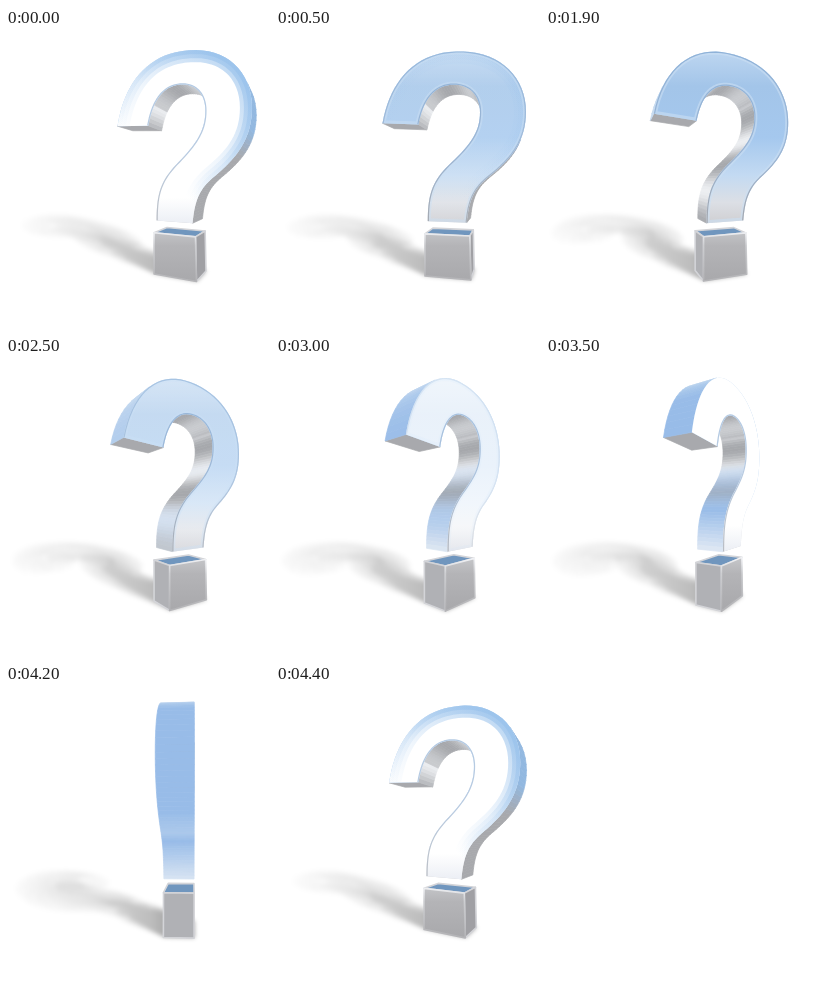
Recreate the animation shown at these times as an HTML page with a canvas. Size 264 by 300 pixels, loop 4500 ms.

```html
<!DOCTYPE html>
<html lang="en">
<head>
<meta charset="utf-8">
<title>Turning question mark</title>
<style>
  html, body { margin: 0; width: 100%; height: 100%; overflow: hidden; background: #fff; }
  canvas { position: absolute; left: 0; top: 0; }
  #shade { filter: blur(2px); }
</style>
</head>
<body>
<canvas id="shade" width="264" height="300"></canvas>
<canvas id="mark" width="264" height="300"></canvas>
<script>
const shade = document.getElementById('shade').getContext('2d');
const ctx = document.getElementById('mark').getContext('2d');
const AXIS = 174, HORIZON = 150, CAMERA = 250, HALF = 14, GROUND = 94;
const FRONT = CAMERA / (CAMERA - HALF);
const LIGHTS = 12;
const clamp = v => Math.max(0, Math.min(1, v));
const mix = (a, b, k) => a.map((v, i) => v + (b[i] - v) * k);
const rgb = c => `rgb(${c.map(Math.round)})`;

// Outlines run clockwise, in screen pixels of the front face seen head-on.
const toLocal = ([x, y]) => [(x - AXIS) / FRONT, (y - HORIZON) / FRONT];

function curve(start, list, steps = 18) {
  const pts = [start];
  for (const [bx, by, cx, cy, dx, dy] of list) {
    const [ax, ay] = pts[pts.length - 1];
    for (let i = 1; i <= steps; i++) {
      const t = i / steps, u = 1 - t;
      const at = (a, b, c, d) => u*u*u*a + 3*u*u*t*b + 3*u*t*t*c + t*t*t*d;
      pts.push([at(ax, bx, cx, dx), at(ay, by, cy, dy)]);
    }
  }
  return pts;
}

const outer = curve([104, 92], [
  [112, 50, 138, 24, 176, 24], [222, 24, 250, 52, 250, 88],
  [250, 118, 234, 134, 214, 150], [201, 161, 196, 172, 194, 194]]);
const inner = curve([154, 194], [
  [154, 168, 158, 154, 176, 137], [197, 118, 207, 106, 207, 86],
  [207, 68, 195, 57, 178, 57], [161, 57, 149, 70, 144, 95]]);
const hook = [...outer, ...inner].map(toLocal);
const dot = [[151, 207], [197, 207], [198, 250], [151, 250]].map(toLocal);

function turn([x, y], z, a) {
  const c = Math.cos(a), s = Math.sin(a);
  return [x * c - z * s, y, x * s + z * c];
}
function project([x, y, z]) {
  const k = CAMERA / (CAMERA - z);
  return [AXIS + x * k, HORIZON + y * k];
}
function area(p) {
  return p.reduce((sum, [x, y], i) => {
    const [u, v] = p[(i + 1) % p.length];
    return sum + x * v - u * y;
  }, 0);
}
function addPoly(c, p) {
  p.forEach(([x, y], i) => i ? c.lineTo(x, y) : c.moveTo(x, y));
  c.closePath();
}
function trace(c, p) {
  c.beginPath();
  addPoly(c, p);
}
function strokeLine(p) {
  ctx.beginPath();
  p.forEach(([x, y]) => ctx.lineTo(x, y));
  ctx.stroke();
}
function ramp(c, x0, y0, x1, y1, stops) {
  const g = c.createLinearGradient(x0, y0, x1, y1);
  stops.forEach(([at, color]) => g.addColorStop(at, color));
  return g;
}

// A wide lamp: faint ground shadows from a ring of light directions.
function drawShadow(polys) {
  shade.fillStyle = ramp(shade, 15, 0, 165, 0, [
    [0, 'rgba(0,0,0,.010)'], [0.5, 'rgba(0,0,0,.014)'], [0.85, 'rgba(0,0,0,.024)'], [1, 'rgba(0,0,0,.036)']]);
  for (let i = 0; i < LIGHTS; i++) {
    const th = i / LIGHTS * 2 * Math.PI;
    const kx = 1.3 + 0.3 * Math.cos(th), kz = 1.4 + 0.45 * Math.cos(th + 0.7);
    shade.beginPath();
    for (const poly of polys) {
      const p = poly.map(([x, y, z]) => {
        const h = GROUND - y;
        return project([x - kx * h, GROUND, z - kz * h]);
      });
      addPoly(shade, area(p) < 0 ? p.reverse() : p);
    }
    shade.fill();
  }
}

function sideColor(isDot, i, y, nx, ny, nz) {
  if (isDot) {
    if (ny < -0.7) return [112, 150, 190];
    return nx > 0 ? [160, 160, 164] : [176, 177, 181];
  }
  if (i === hook.length - 1) return [168, 169, 173];
  const low = clamp((y + 45) / 25);
  let color;
  if (i >= outer.length) {
    const glow = 0.5 + 0.5 * Math.sin(i * 0.33);
    color = mix([166, 168, 172], [236, 238, 241], glow * (ny > 0.5 ? 0.5 : 1));
    if (!low) return color;
  } else {
    color = nx > 0 ? mix([146, 184, 224], [168, 169, 173], low) : [198, 218, 240];
  }
  // Walls turned to the viewer mirror the blue sky, paler towards the foot.
  const sky = mix([152, 188, 232], [226, 234, 244], clamp((y - 5) / 40));
  return mix(color, sky, clamp((nz - 0.45) / 0.3) * (i < outer.length ? 1 : low));
}

function drawSolid(shape, a, isDot) {
  const near = shape.map(p => turn(p, HALF, a));
  const far = shape.map(p => turn(p, -HALF, a));
  const front = near.map(project), back = far.map(project);
  const walls = shape.map((p, i) => {
    const j = (i + 1) % shape.length;
    return [near[i], near[j], far[j], far[i]];
  });

  const quads = [];
  walls.forEach((wall, i) => {
    const pts = wall.map(project);
    if (area(pts) >= 0) return;
    const p = shape[i], q = shape[(i + 1) % shape.length];
    const dx = q[0] - p[0], dy = q[1] - p[1], len = Math.hypot(dx, dy);
    const n = dy / len;
    quads.push({
      pts, depth: wall.reduce((sum, v) => sum + v[2], 0),
      color: rgb(sideColor(isDot, i, p[1], n * Math.cos(a), -dx / len, n * Math.sin(a)))
    });
  });
  quads.sort((p, q) => p.depth - q.depth);

  ctx.lineJoin = 'round';
  for (const { pts, color } of quads) {
    trace(ctx, pts);
    ctx.fillStyle = color;
    ctx.fill();
    ctx.lineWidth = isDot ? 1.6 : 0.7;
    ctx.strokeStyle = isDot ? '#d3d4d8' : color;
    ctx.stroke();
  }

  const facing = area(front) > 0;
  if (facing || area(back) < 0) (isDot ? drawDotFace : drawHookFace)(facing ? front : back, a);
  return [near, far, ...walls];
}

function drawDotFace(face) {
  trace(ctx, face);
  ctx.fillStyle = ramp(ctx, 0, 203, 0, 252, [[0, '#c4c5c8'], [0.3, '#b4b4b7'], [1, '#a9a9ac']]);
  ctx.fill();
  ctx.lineWidth = 1.6;
  ctx.strokeStyle = ramp(ctx, 0, 203, 0, 252, [[0, '#f0f1f4'], [0.3, '#cdced1'], [1, '#b4b4b7']]);
  ctx.stroke();
}

function drawHookFace(face, a) {
  // Angle of the visible face to the viewer, and how much white it reflects.
  const tilt = Math.atan(Math.tan(a)) * 180 / Math.PI;
  const white = tilt > 0 ? clamp((tilt - 10) / 12) : clamp((-tilt - 25) / 30);
  const rim = face.slice(0, outer.length), hollow = face.slice(outer.length);
  ctx.save();
  trace(ctx, face);
  ctx.fillStyle = ramp(ctx, 0, 24, 0, 195, [[0, '#bdd6f0'], [0.2, '#a3c5e9'], [0.5, '#a5c8ee'],
    [0.72, '#c3daf2'], [0.88, '#dcdfe5'], [1, '#cfcfd2']]);
  ctx.fill();
  ctx.globalAlpha = white;
  ctx.fillStyle = ramp(ctx, 0, 24, 0, 195, [[0, '#fff'], [0.85, '#fff'], [1, '#eceff5']]);
  ctx.fill();
  ctx.clip();

  if (tilt > 0) {
    ctx.strokeStyle = ramp(ctx, 150, 140, 236, 50, [[0, 'rgba(150,192,235,0)'], [0.4, 'rgba(150,192,235,.15)'], [1, 'rgba(150,192,235,.6)']]);
    for (const width of [24, 16, 8]) {
      ctx.lineWidth = width;
      strokeLine(rim);
    }
  }
  ctx.globalAlpha = 0.6 * (1 - white);
  ctx.lineWidth = 6;
  ctx.strokeStyle = '#cbdff4';
  trace(ctx, face);
  ctx.stroke();

  ctx.lineWidth = 2.4;
  ctx.strokeStyle = ramp(ctx, 0, 24, 0, 195, [[0, '#8fb2d8'], [0.6, '#9bb4d2'], [1, '#a3a7ae']]);
  ctx.globalAlpha = 1 - white;
  strokeLine(rim);
  ctx.globalAlpha = 1 - 0.3 * white;
  strokeLine(hollow);
  ctx.restore();
}

// Slow drift to one side, then a quick whirl back to the start.
const keys = [[0, 24], [3500, -60], [3900, -168], [4400, -333], [4500, -336]];
function angleAt(t) {
  const i = keys.findIndex(k => k[0] > t);
  const [t0, a0] = keys[i - 1], [t1, a1] = keys[i];
  return a0 + (a1 - a0) * (t - t0) / (t1 - t0);
}

const start = performance.now();
function draw() {
  const t = Math.floor((performance.now() - start) % 4500 / 100) * 100;
  const a = angleAt(t) * Math.PI / 180;
  shade.clearRect(0, 0, 264, 300);
  ctx.clearRect(0, 0, 264, 300);
  const polys = [...drawSolid(dot, a, true), ...drawSolid(hook, a, false)];
  drawShadow(polys);
  requestAnimationFrame(draw);
}
draw();
</script>
</body>
</html>
```
